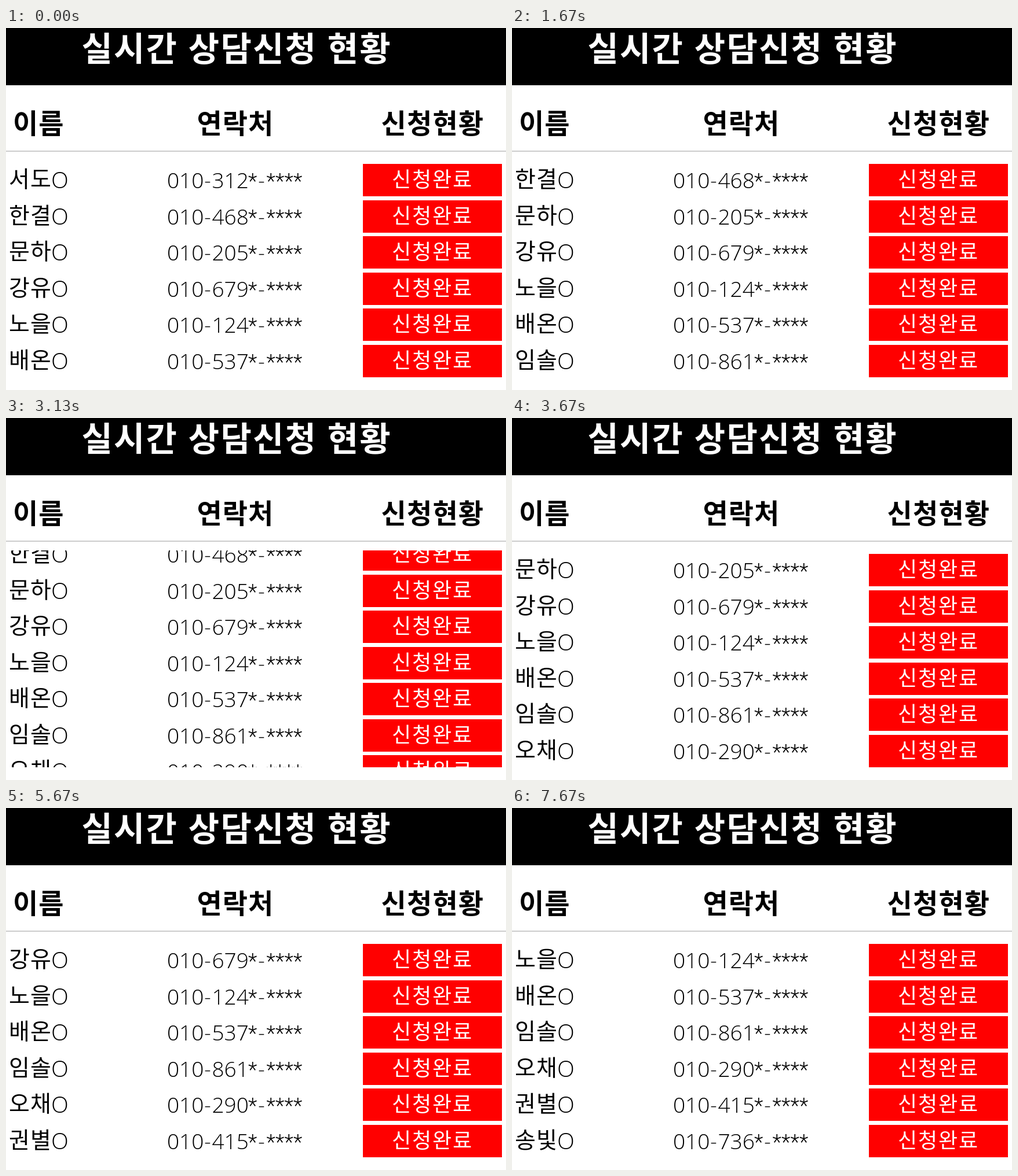
An HTML page with a canvas that plays this animation: 863 px wide and 626 px high, repeating every 8 s.

```html
<!DOCTYPE html>
<html lang="ko">
<head>
<meta charset="utf-8">
<style>
  html, body { margin: 0; width: 100%; height: 100%; overflow: hidden; background: #fff; }
  canvas { display: block; }
</style>
</head>
<body>
<canvas id="stage" width="863" height="626"></canvas>
<script>
const ctx = document.getElementById("stage").getContext("2d");

const HANGUL = '"Noto Sans CJK KR", "Noto Sans CJK", sans-serif';
const LATIN = '"Open Sans", "Noto Sans", sans-serif';
const STARS = 'Roboto, sans-serif';

const LOOP = 8000;
const FRAME = 1000 / 15;
const FRAMES_PER_ROW = 30;
const ROW_HEIGHT = 62.5;
const LIST = { top: 229, bottom: 604, firstRow: 235 };

const applicants = [
  ["서도", 312], ["한결", 468], ["문하", 205], ["강유", 679], ["노을", 124],
  ["배온", 537], ["임솔", 861], ["오채", 290], ["권별", 415], ["송빛", 736]
];

function rect(x, y, width, height, color) {
  ctx.fillStyle = color;
  ctx.fillRect(x, y, width, height);
}

function text(content, x, y, font, color = "#000", spacing = 0, wordSpacing = 0) {
  ctx.font = font;
  ctx.letterSpacing = spacing + "px";
  ctx.wordSpacing = wordSpacing + "px";
  ctx.fillStyle = color;
  ctx.fillText(content, x, y);
}

function drawHeader() {
  rect(0, 0, 863, 99, "#000");
  text("실시간 상담신청 현황", 130.5, 57, `bold 58px ${HANGUL}`, "#fff", 2.2, 2.3);
  const heading = `bold 47px ${HANGUL}`;
  text("이름", 12, 182, heading, "#000", 1);
  text("연락처", 329.5, 182, heading, "#000", 1);
  text("신청현황", 647.5, 182, heading, "#000", 1.2);
  rect(0, 212, 863, 2, "#ccc");
}

function drawRow([name, digits], top) {
  const latin = `350 37px ${LATIN}`;
  const stars = `300 36px ${STARS}`;
  const baseline = top + 42;

  text(name, 5, top + 40, `39px ${HANGUL}`, "#000", 1);
  text("O", 78, top + 42, `350 39px ${LATIN}`);

  text("010", 278, baseline, latin);
  text("-", 342, baseline, latin);
  text(digits, 355.5, baseline, latin);
  text("*", 418, baseline, stars);
  text("-", 435, baseline, latin);
  text("****", 449.5, baseline, stars, "#000", 0.2);

  rect(616, top, 240, 56, "#f00");
  text("신청완료", 666, top + 40, `36px ${HANGUL}`, "#fff", 1.9);
}

// Each row pauses, then scrolls away with a cosine ease.
function scrollOffset(time) {
  const frame = Math.floor((time + 3.4) / FRAME);
  const step = Math.floor(frame / FRAMES_PER_ROW);
  const phase = frame % FRAMES_PER_ROW;
  const progress = phase >= 25 ? 1 : Math.max(0, (phase - 9.94) * 0.0645);
  return (step + 0.5 - Math.cos(Math.PI * progress) / 2) * ROW_HEIGHT;
}

function draw(time) {
  rect(0, 0, 863, 626, "#fff");
  drawHeader();

  ctx.save();
  ctx.beginPath();
  ctx.rect(0, LIST.top, 863, LIST.bottom - LIST.top);
  ctx.clip();
  const offset = scrollOffset(time);
  applicants.forEach((applicant, i) => {
    const top = Math.round(LIST.firstRow + i * ROW_HEIGHT - offset);
    if (top + 56 > LIST.top && top < LIST.bottom) drawRow(applicant, top);
  });
  ctx.restore();
}

const start = performance.now();
function tick() {
  draw((performance.now() - start) % LOOP);
  requestAnimationFrame(tick);
}
tick();
</script>
</body>
</html>
```
